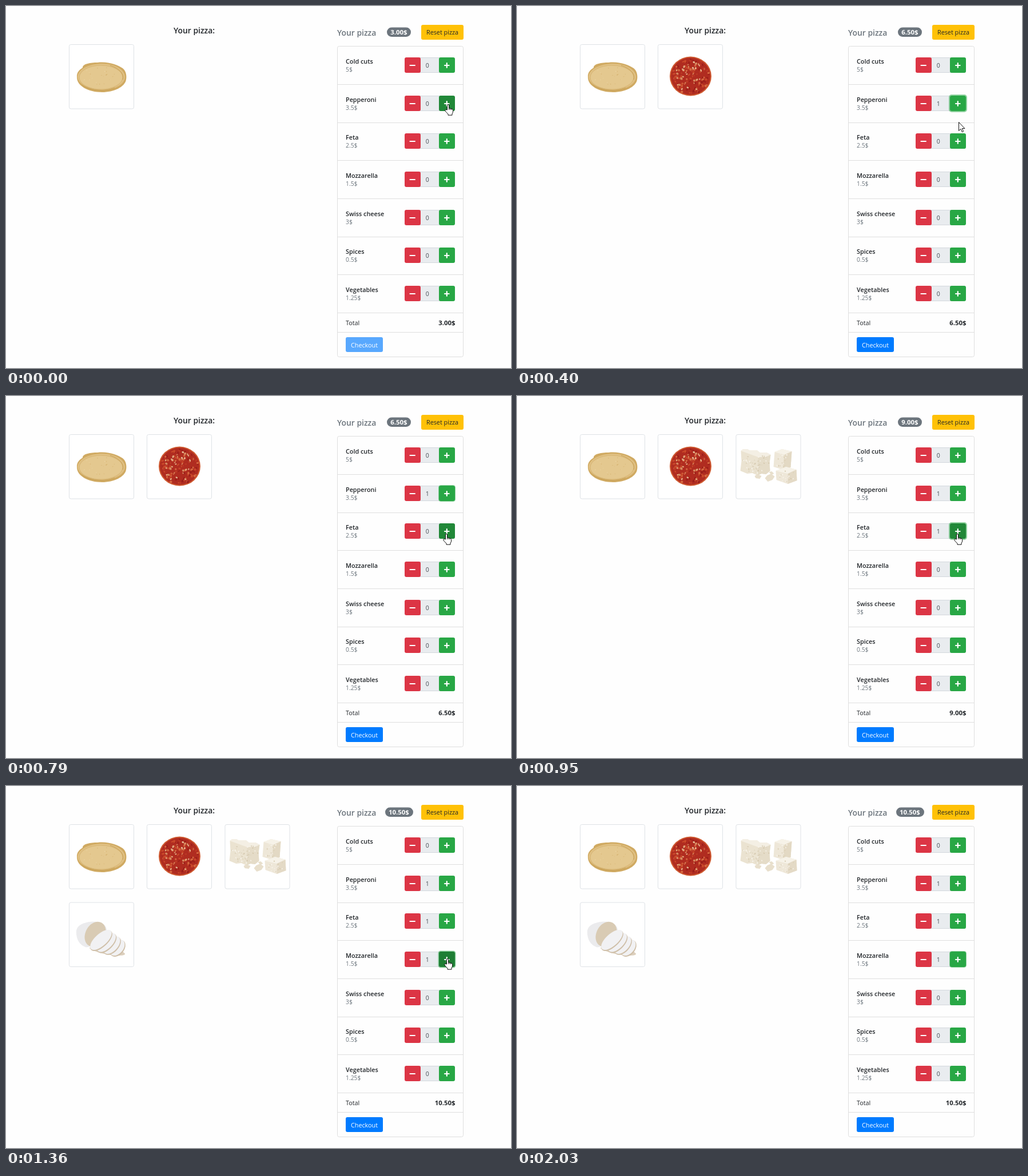
An HTML page for the animation above (2130 ms loop, 883 by 634 pixels).

```html
<!DOCTYPE html>
<html lang="en">
<head>
<meta charset="utf-8">
<title>Pizza builder</title>
<style>
  html, body { margin: 0; width: 100%; height: 100%; overflow: hidden; background: #fefefe; }
  svg { display: block; }
  text { font-family: "Open Sans", "Noto Sans", sans-serif; font-size: 11px; fill: #212529; }
  .head { font-size: 13.9px; font-weight: 600; }
  .name { font-size: 10.8px; font-weight: 600; }
  .price { font-size: 10.3px; fill: #6c757d; }
  .count { font-size: 10.5px; fill: #495057; }
  .sum { font-size: 11.4px; font-weight: 700; }
  .btn { font-size: 10.8px; font-weight: 500; }
  .white { fill: #fff; }
  .line { fill: none; stroke: #dfdfdf; }
  .icon { fill: none; stroke: #fff; stroke-width: 2.2; stroke-linecap: round; }
  .ring { fill: none; stroke: #28a745; stroke-opacity: .5; }
  .pointer { fill: #fff; stroke: #111; stroke-linejoin: round; }
</style>
</head>
<body>
<svg id="stage" width="883" height="634" viewBox="0 0 883 634">
  <text class="head" x="293" y="47.5">Your pizza:</text>
  <text class="head" x="579" y="51.5" style="fill:#6c757d">Your pizza</text>
  <rect id="pill" y="37.5" height="16.5" rx="8.25" fill="#6c757d"/>
  <text id="badge" class="sum white" x="687" y="50" text-anchor="middle"></text>
  <rect x="726" y="33" width="74" height="26" rx="3" fill="#ffc107"/>
  <text class="btn" x="763" y="50" text-anchor="middle">Reset pizza</text>

  <rect class="line" x="579.5" y="70.5" width="220" height="544" rx="3"/>
  <path class="line" d="M580 571.5h219"/>
  <g id="rows"></g>
  <text class="btn" x="594" y="558.5">Total</text>
  <text id="total" class="sum" x="785.5" y="558.5" text-anchor="end"></text>
  <rect id="checkout" x="594" y="580" width="65" height="26" rx="3" fill="#007bff"/>
  <text class="btn white" x="626.5" y="597.5" text-anchor="middle">Checkout</text>

  <!-- dough -->
  <g class="card" transform="translate(110 67)">
    <g class="food">
      <path d="M14 58C13 48 20 44 24 41 24 34 38 32 50 32 70 30 84 36 94 42 101 47 101 58 100 62 98 75 78 84 58 84 34 84 14 73 14 58Z" fill="#d0aa62"/>
      <path d="M15 56C18 43 34 35 56 34 80 33 98 45 98 57 98 71 78 80 58 80 34 80 15 69 15 56Z" fill="#e0c083"/>
      <ellipse cx="56" cy="58" rx="38" ry="21" fill="#e4c88f" stroke="#d3b06c" stroke-width=".8"/>
      <path d="M72 37C90 43 97 53 94 62M23 71C35 81 62 84 80 76" fill="none" stroke="#c79f54"/>
      <g class="specks" data-n="26" data-box="56 56 33 16" data-colors="#d9b878 #ecd6a8 #d3af6b" data-size=".8"></g>
    </g>
  </g>
  <!-- pepperoni -->
  <g class="card" transform="translate(246 67)">
    <g class="food">
      <ellipse cx="57.5" cy="56" rx="36.5" ry="34.5" fill="#cf5a30"/>
      <ellipse cx="57.5" cy="56" rx="34.5" ry="32.5" fill="#b02c20"/>
      <g class="specks" data-n="110" data-box="57.5 56 33 31" data-colors="#c9482a #9c1f1a #bd3a26 #d4673f" data-size="2.3"></g>
      <g class="specks" data-n="34" data-box="57.5 56 31 29" data-colors="#e0a377 #d68a60 #e8bd95" data-size="2"></g>
    </g>
  </g>
  <!-- feta -->
  <g class="card" transform="translate(382.5 67)">
    <g class="food">
      <path d="M9 29 13 26 20 26 24 28 37 28 42 32 54 32 61 36 59 50 60 64 53 70 45 69 38 72 29 68 20 69 8 64 10 47Z" fill="#ebe3d1"/>
      <path d="M9 29 13 26 20 26 24 28 37 28 42 32 54 32 61 36 52 40 39 40Z" fill="#f4efe4"/>
      <path d="M39 40 52 40 61 36 59 50 60 64 53 70 45 69 38 72Z" fill="#e5dcc8"/>
      <path d="M68 31 81 26 98 30 96 58 82 62 66 57Z" fill="#eee7d8"/>
      <path d="M68 31 81 26 98 30 85 36Z" fill="#f6f2e8"/>
      <path d="M85 36 98 30 96 58 82 62Z" fill="#e3d9c4"/>
      <path d="M70 64 88 57 106 62 107 81 91 87 71 80Z" fill="#eee7d8"/>
      <path d="M70 64 88 57 106 62 91 69Z" fill="#f6f2e8"/>
      <path d="M91 69 106 62 107 81 91 87Z" fill="#e4dac6"/>
      <path d="M33 73l5-3 7 3-3 5-7-1ZM51 77l4-5 7-3 6 5-4 6-8 3ZM58 66l5-1 4 4-5 2Z" fill="#e8dfcc"/>
      <g class="specks" data-n="46" data-box="34 51 24 17" data-colors="#d6cab0 #f7f3ea #dfd5bf" data-size="1.5"></g>
      <g class="specks" data-n="18" data-box="81 45 13 13" data-colors="#d9cdb4 #f7f3ea" data-size="1.2"></g>
      <g class="specks" data-n="20" data-box="88 73 16 10" data-colors="#d6cab0 #f7f3ea" data-size="1.2"></g>
    </g>
  </g>
  <!-- mozzarella -->
  <g class="card" transform="translate(110 203.5)">
    <g class="food">
      <path d="M35 80C45 87 62 92 80 93 92 94 99 93 98 90L84 78Z" fill="#dccfbd"/>
      <path d="M13 50C14 40 28 34 44 34 58 34 66 41 66 49 66 66 50 76 30 79 18 75 12 64 13 50Z" fill="#ebebed"/>
      <ellipse cx="46" cy="56" rx="17" ry="23" transform="rotate(28 46 56)" fill="#d9cbb4"/>
      <g id="slices"></g>
    </g>
  </g>

  <path id="arrow" class="pointer" d="M.5.5v15l3.4-3.2 2.4 5.4 2.3-1-2.3-5.2h4.6Z"/>
  <g id="hand">
    <path class="pointer" d="M4.5 10V2a1.5 1.5 0 0 1 3 0v5l2 .3 2 .6 2 .8 1 1.6v3.6l-1.5 3v2.3h-7v-2L2.3 13.6.8 11c-.5-1.4 1-2 2-1.3Z"/>
    <path d="M7.5 7v3M9.6 7.5V10M11.6 8v2.3" fill="none" stroke="#111" stroke-width=".8"/>
  </g>
</svg>
<script>
const $ = id => document.getElementById(id);
const NS = "http://www.w3.org/2000/svg";

function add(parent, tag, attrs, label) {
  const el = document.createElementNS(NS, tag);
  for (const key in attrs) el.setAttribute(key, attrs[key]);
  if (label !== undefined) el.textContent = label;
  parent.append(el);
  return el;
}

let seed = 11;
function random() {
  seed = (seed * 16807) % 2147483647;
  return seed / 2147483647;
}

for (const group of document.querySelectorAll(".specks")) {
  const { n, box, colors, size } = group.dataset;
  const [cx, cy, rx, ry] = box.split(" ").map(Number);
  const palette = colors.split(" ");
  for (let i = 0; i < n; i++) {
    const angle = random() * 2 * Math.PI, reach = Math.sqrt(random());
    const x = cx + rx * reach * Math.cos(angle), y = cy + ry * reach * Math.sin(angle);
    add(group, "ellipse", {
      cx: x.toFixed(1), cy: y.toFixed(1),
      rx: size * (.5 + random() * .7), ry: size * (.4 + random() * .6),
      transform: `rotate(${random() * 180} ${x} ${y})`,
      fill: palette[i % palette.length]
    });
  }
}

// back to front, each slice with a shaded lower edge
for (let i = 3; i >= 0; i--) {
  const x = 56 + i * 9.5, y = 66 + i * 4.5;
  const turn = `rotate(${48 - i * 3} ${x} ${y})`;
  add($("slices"), "ellipse", { cx: x + 1.5, cy: y + .5, rx: 11, ry: 24 - i * 2.5, transform: turn, fill: "#cfbfa8" });
  add($("slices"), "ellipse", { cx: x, cy: y, rx: 10.5, ry: 23.5 - i * 2.5, transform: turn, fill: "#f1f1f3" });
}

const cards = [...document.querySelectorAll(".card")];
for (const card of cards) {
  card.prepend(add(card, "rect", { x: .5, y: .5, width: 113, height: 112.5, rx: 3, fill: "#fff", stroke: "#dee2e6" }));
}

const items = [
  ["Cold cuts", "5$"], ["Pepperoni", "3.5$"], ["Feta", "2.5$"], ["Mozzarella", "1.5$"],
  ["Swiss cheese", "3$"], ["Spices", "0.5$"], ["Vegetables", "1.25$"]
];
const rows = items.map(([name, price], i) => {
  const g = add($("rows"), "g", {});
  const y = Math.round(89.8 + 66.7 * i);
  add(g, "path", { class: "line", d: `M580 ${Math.round(136.9 + 66.7 * i) + .5}h219` });
  add(g, "text", { class: "name", x: 594, y: y + 11 }, name);
  add(g, "text", { class: "price", x: 594, y: y + 25 }, price);
  add(g, "rect", { x: 723.5, y: y + .5, width: 35, height: 26, fill: "#e9ecef", stroke: "#d3d8dd" });
  add(g, "rect", { x: 697, y, width: 28, height: 27, rx: 3, fill: "#dc3545" });
  const ring = add(g, "rect", { class: "ring" });
  const plus = add(g, "rect", { x: 757, y, width: 28, height: 27, rx: 3 });
  add(g, "path", { class: "icon", d: `M706.5 ${y + 14}h8.4M767 ${y + 14}h7.6m-3.8-3.8v7.6` });
  const count = add(g, "text", { class: "count", x: 733.8, y: y + 18 });
  return { y, ring, plus, count };
});

// at: ms, cards: shown, food: pictures loaded, row: hovered, ring: [row, width], pointer: [kind, x, y]
const steps = [
  { at: 0, sum: 3, cards: 1, food: 1, row: 1, pointer: ["hand", 767, 172] },
  { at: 150, sum: 6.5, cards: 2, down: true, ring: [1, 1], pointer: ["hand", 767, 174] },
  { at: 270, ring: [1, 2], pointer: ["hand", 767, 176.5] },
  { at: 400, food: 2, row: -1, down: false, pointer: ["arrow", 772, 203] },
  { at: 530, pointer: ["arrow", 769, 223] },
  { at: 670, row: 2, pointer: ["hand", 764, 237] },
  { at: 790, ring: [1, 1], pointer: ["hand", 764, 241] },
  { at: 950, sum: 9, cards: 3, food: 3, ring: [2, 2] },
  { at: 1100, row: 3, pointer: ["hand", 766, 302] },
  { at: 1360, sum: 10.5, cards: 4, food: 4, down: true, ring: [3, 1.5] },
  { at: 1480, down: false, ring: [3, 2] },
  { at: 1600, row: -1, pointer: ["arrow", 812, 460] },
  { at: 1720, pointer: ["arrow", 860, 630] },
  { at: 1880, pointer: ["none", 0, 0] },
  { at: 2030, ring: [3, 1] }
];
const LOOP = 2130;
// each step keeps whatever it does not change
const states = [];
steps.forEach((step, i) => states.push({ ...states[i - 1], ...step }));

function draw(s) {
  const price = s.sum.toFixed(2) + "$";
  const wide = s.sum >= 10;
  $("badge").textContent = $("total").textContent = price;
  $("pill").setAttribute("x", wide ? 663 : 666);
  $("pill").setAttribute("width", wide ? 49 : 42);
  $("checkout").setAttribute("opacity", s.cards > 1 ? 1 : .65);

  cards.forEach((card, i) => {
    card.style.display = i < s.cards ? "" : "none";
    card.querySelector(".food").style.display = i < s.food ? "" : "none";
  });

  rows.forEach(({ y, ring, plus, count }, i) => {
    count.textContent = i > 0 && i < s.cards ? 1 : 0;
    plus.setAttribute("fill", i !== s.row ? "#28a745" : s.down ? "#1e7e34" : "#218838");
    const w = s.ring && s.ring[0] === i ? s.ring[1] : 0;
    const box = { x: 757 - w / 2, y: y - w / 2, width: 28 + w, height: 27 + w, rx: 3 + w / 2, "stroke-width": w };
    for (const key in box) ring.setAttribute(key, box[key]);
  });

  const [kind, x, y] = s.pointer;
  for (const id of ["arrow", "hand"]) {
    $(id).style.display = id === kind ? "" : "none";
    $(id).setAttribute("transform", `translate(${x} ${y})`);
  }
}

const start = performance.now();
let shown;
function tick() {
  const t = (performance.now() - start) % LOOP;
  const state = states.findLast(s => s.at <= t);
  if (state !== shown) draw(shown = state);
  requestAnimationFrame(tick);
}
tick();
</script>
</body>
</html>
```
